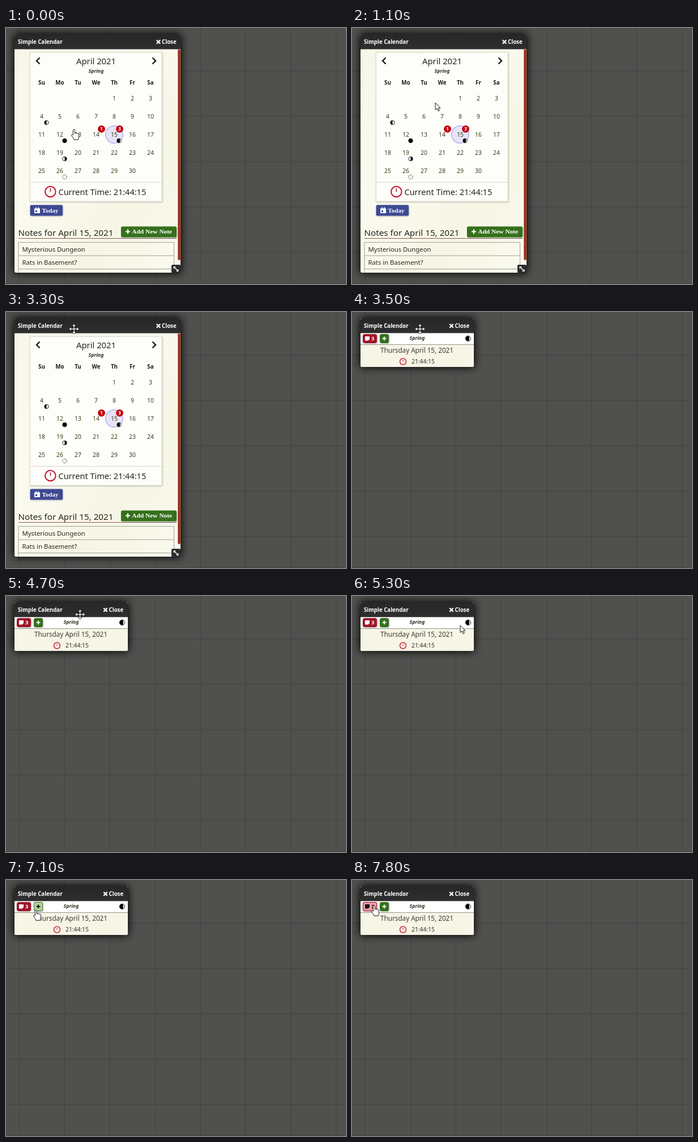
An HTML page for the animation above (8000 ms loop, 600 by 452 pixels).

```html
<!DOCTYPE html>
<html lang="en">
<head>
<meta charset="utf-8">
<title>Calendar</title>
<style>
  html, body { margin: 0; width: 100%; height: 100%; overflow: hidden; background: #50504e; }
  svg { display: block; width: 600px; height: 452px; font-family: "Noto Sans", "Open Sans", sans-serif; }
  .b { font-weight: 600; }
  .m { text-anchor: middle; }
  .title { font-weight: 600; font-size: 9.7px; fill: #fff; }
  .season { font-weight: 600; font-style: italic; font-size: 8.8px; fill: #2b2a18; }
  .serif { font-family: "Liberation Serif", serif; font-weight: 700; fill: #fff; }
  .day { font-size: 10.4px; fill: #3d3b14; }
</style>
</head>
<body>
<svg viewBox="0 0 600 452">
  <defs>
    <filter id="glow" x="-20%" y="-40%" width="140%" height="180%"><feGaussianBlur stdDeviation="7.5"/></filter>
    <filter id="soft" x="-10%" y="-30%" width="120%" height="170%">
      <feDropShadow dx=".6" dy=".8" stdDeviation="1.2" flood-opacity=".35"/>
    </filter>
    <linearGradient id="paper" x2="1" y2="1">
      <stop offset="0" stop-color="#f6f6e7"/><stop offset=".35" stop-color="#fbfaf0"/>
      <stop offset=".7" stop-color="#f6f6e6"/><stop offset="1" stop-color="#fafaee"/>
    </linearGradient>
    <linearGradient id="bar" x2="0" y2="1">
      <stop offset="0" stop-color="#272628"/><stop offset="1" stop-color="#302f30"/>
    </linearGradient>
    <path id="cross" d="M-3.2-3.2 3.2 3.2M3.2-3.2-3.2 3.2" stroke="#fff" stroke-width="2.3"/>
    <path id="plus" d="M-4 0H4M0-4V4" stroke-width="2.2"/>
  </defs>

  <rect width="600" height="452" fill="#50504e"/>
  <path id="grid" stroke="#444342"/>

  <g id="full">
    <rect x="14" y="10" width="295" height="423" rx="4" filter="url(#glow)"/>
    <rect x="15" y="11" width="293" height="421" rx="3" fill="url(#paper)"/>
    <path d="M15 37.500V14a3 3 0 0 1 3-3H305a3 3 0 0 1 3 3V37.500Z" fill="url(#bar)"/>
    <text class="title" x="21" y="28.300">Simple Calendar</text>
    <use href="#cross" x="269" y="24.500"/>
    <text class="title" x="275" y="28.300">Close</text>

    <rect x="42.500" y="43.500" width="232.500" height="262.500" fill="#fdfdfa" stroke="#e0dece" filter="url(#soft)"/>
    <path d="M59.500 52.500 54 58 59.500 63.500M258.500 52.500 264 58 258.500 63.500" fill="none" stroke="#191813" stroke-width="2.4"/>
    <text class="m" x="159" y="64" font-size="14.800" fill="#26251c">April 2021</text>
    <text class="m season" x="159" y="79">Spring</text>
    <g id="days"></g>
    <path d="M43 272.500H275" stroke="#d9d7ca"/>
    <g fill="none" stroke="#c3142d" stroke-width="2"><circle cx="78.300" cy="289" r="9.300"/><path d="M78.300 283V289.500" stroke-width="1.500"/></g>
    <text x="92.500" y="294.500" font-size="14.500" fill="#26251c">Current Time: 21:44:15</text>

    <rect x="42.500" y="312.500" width="57.500" height="19" rx="2.500" fill="#3d4a93" filter="url(#soft)"/>
    <path d="M50 318.500H60V327H50ZM52 316.500h1.600v2H52ZM56.400 316.500H58v2H56.400Z" fill="#fff"/>
    <rect x="52" y="322" width="3" height="3" fill="#3d4a93"/>
    <text class="serif" x="63.500" y="326" font-size="11">Today</text>

    <text x="21.500" y="367" font-size="15.200" fill="#26251c">Notes for April 15, 2021</text>
    <path d="M22 371.500H301" stroke="#8f5a52"/>
    <rect x="203" y="350.500" width="98" height="19" rx="2.500" fill="#36701f" filter="url(#soft)"/>
    <use href="#plus" x="215" y="359.500" stroke="#fff"/>
    <text class="serif" x="222.300" y="363.300" font-size="11.400">Add New Note</text>
    <path d="M22 432V378.500H296.500V432M22 402H296.500M22 425.500H296.500" fill="none" stroke="#a09e96"/>
    <g font-size="11.300" fill="#26251c"><text x="28.500" y="395">Mysterious Dungeon</text><text x="28.500" y="417.500">Rats in Basement?</text></g>

    <rect x="303.500" y="38" width="4" height="371.500" rx="1.500" fill="#9b2a1c" stroke="#cc5a3a" stroke-width=".8"/>
    <rect x="292" y="418" width="16" height="14.500" rx="2" fill="#2d2c2c"/>
    <path d="M297 422.500 303 428.500" stroke="#fff" stroke-width="1.600"/>
    <path d="M295.500 421H300L295.500 425.500ZM304.500 430H300L304.500 425.500Z" fill="#fff"/>
  </g>

  <g id="compact">
    <rect x="14" y="10" width="202" height="88" rx="4" filter="url(#glow)"/>
    <rect x="15" y="11" width="200" height="86" rx="2" fill="#f6f5e6"/>
    <path d="M15 37.500V14a3 3 0 0 1 3-3H212a3 3 0 0 1 3 3V37.500Z" fill="url(#bar)"/>
    <text class="title" x="21" y="28.300">Simple Calendar</text>
    <use href="#cross" x="175.500" y="24.500"/>
    <text class="title" x="181.500" y="28.300">Close</text>
    <rect x="15" y="37.500" width="200" height="20" fill="#fff"/>
    <path d="M15 57.500H215" stroke="#96948c"/>
    <g id="buttons"></g>
    <text class="m season" x="115" y="49.300">Spring</text>
    <g id="phase"></g>
    <text class="m" x="114.500" y="71.800" font-size="11.700" fill="#3b3a33">Thursday April 15, 2021</text>
    <g fill="none" stroke="#c9263c" stroke-width="1.500"><circle cx="90" cy="87.500" r="5.500"/><path d="M90 84V88" stroke-width="1"/></g>
    <text x="105" y="91" font-size="10.300" fill="#33322b">21:44:15</text>
  </g>

  <g id="cursor" stroke="#161616" stroke-linejoin="round" fill="#fff">
    <path id="arrow" d="M0 0V12.500L3 9.800 5.200 14.800 7.300 13.900 5.200 9.200H9Z"/>
    <path id="hand" d="M-1.600 9V.5a1.500 1.500 0 0 1 3 0V6c.4-1.200 2.500-1 2.600.3.400-1 2.300-.8 2.400.5.500-.8 2.200-.5 2.200.9V12c0 2.500-1.200 3-1.200 5.200H-.2C-.5 14.500-2.500 13-4.400 9.900-5.200 8.500-3.200 7.300-1.600 9Z"/>
    <path id="move" stroke-width=".8" d="M0-9 3.300-5H1V-1H5V-3.300L9 0 5 3.300V1H1V5H3.300L0 9-3.300 5H-1V1H-5V3.300L-9 0-5-3.300V-1H-1V-5H-3.300Z"/>
  </g>
</svg>
<script>
const $ = id => document.getElementById(id);
const colX = c => 63 + 32 * c;
const rowY = r => 124 + 32 * r;

let lines = "M0 451.500H600";
for (let i = 0; i < 8; i++) lines += `M${Math.round(23.3 + 79.8 * i) + .5} 0V452`;
for (let i = 0; i < 5; i++) lines += `M0 ${76 + 80 * i}H600`;
$("grid").setAttribute("d", lines);

// Dark limb on the left; k is the bulge of the terminator to the right.
function moon(x, y, r, k, flip = 1, dash = "") {
  return `<g transform="translate(${x} ${y}) scale(${flip} 1)">
    <circle r="${r}" fill="#fff" stroke="#111" stroke-width=".9" stroke-dasharray="${dash}"/>` +
    (dash ? "" : `<path d="M0 ${-r}A${r} ${r} 0 0 0 0 ${r}A${k} ${r} 0 0 0 0 ${-r}"/>`) + "</g>";
}

function badge(x, n) {
  return `<circle cx="${x}" cy="178.300" r="6.400" fill="#c4000d"/>
    <text class="m b" x="${x}" y="181.300" font-size="8.500" fill="#fff">${n}</text>`;
}

let html = ["Su", "Mo", "Tu", "We", "Th", "Fr", "Sa"].map((d, c) =>
  `<text class="m b" x="${colX(c)}" y="100" font-size="9.800" fill="#1f1e15">${d}</text>`).join("");
html += '<circle cx="191" cy="188" r="15.300" fill="#e6e4f5" stroke="#b9b5f2" stroke-width="1.600"/>';
for (let d = 1; d <= 30; d++) {
  const cell = d + 3;
  html += `<text class="m day" x="${colX(cell % 7)}" y="${rowY(Math.floor(cell / 7)) + 3.8}">${d}</text>`;
}
html += badge(168.5, 1) + badge(200.5, 3);
html += moon(71.5, 167, 3.7, .01) + moon(103.5, 199, 3.7, 3.7) + moon(199.5, 199, 3.7, 1.6) +
  moon(103.5, 231, 3.7, .01, -1) + moon(103.5, 263, 3.7, 0, 1, "1.600 1");
$("days").innerHTML = html;
$("phase").innerHTML = moon(205, 46.8, 4.6, 2);

function noteButton(fill, ink, edge) {
  return `<rect x="19.500" y="39.500" width="24" height="15" rx="2.500" fill="${fill}" stroke="${edge}"/>
    <path d="M23 43H31V48L28.500 50.500H23Z" fill="${ink}"/>
    <text class="m b" x="36.800" y="50.200" font-size="9.500" fill="${ink}">3</text>`;
}
function addButton(fill, ink, edge) {
  return `<rect x="49.500" y="39.500" width="15" height="15" rx="2.500" fill="${fill}" stroke="${edge}"/>
    <use href="#plus" transform="translate(57 46.800) scale(.85)" stroke="${ink}"/>`;
}
$("buttons").innerHTML =
  `<g filter="url(#soft)">${noteButton("#a0152b", "#fff", "#a0152b")}${addButton("#36701f", "#fff", "#36701f")}</g>
   <g id="noteHot">${noteButton("#f79da6", "#111", "#a0152b")}</g>
   <g id="addHot">${addButton("#b4d39a", "#111", "#477a32")}</g>`;

// Pointer way points: time, x, y
const path = [
  [0, 120, 180], [100, 246, 100], [200, 198, 353], [300, 150, 334],
  [400, 150, 334], [500, 134, 290], [600, 132, 180], [700, 150, 95], [800, 205, 68],
  [900, 240, 150], [1000, 190, 215], [1100, 147, 132], [1200, 190, 84], [1300, 238, 200],
  [1400, 250, 285], [1500, 190, 335], [1600, 95, 300], [1700, 67, 205], [1800, 74, 115],
  [1900, 98, 60], [2000, 116, 36], [2100, 120, 30],
  [4500, 120, 30], [4800, 136, 34], [5100, 178, 48], [5300, 191, 52], [5400, 191, 52], [5500, 195, 52],
  [5600, 195, 52], [5900, 160, 70], [6200, 90, 78], [6350, 65, 76], [6500, 78, 77],
  [6700, 64, 64], [6900, 55, 53], [7100, 53, 54], [7200, 51, 52], [7300, 43, 48],
  [7400, 37, 47], [7500, 34, 48], [7600, 36, 49], [7800, 39, 46], [8000, 39, 46]
];

const ramp = (t, a, b) => Math.min(1, Math.max(0, (t - a) / (b - a)));

function place(t) {
  const i = Math.max(1, path.findIndex(p => p[0] >= t));
  const [t0, x0, y0] = path[i - 1], [t1, x1, y1] = path[i];
  const k = ramp(t, t0, t1);
  return [x0 + (x1 - x0) * k, y0 + (y1 - y0) * k];
}

function shape(x, y, open) {
  if (y < 37) return "move";
  if (!open) return y < 55 && y > 39 && (x > 19 && x < 44 || x > 49 && x < 65) ? "hand" : "arrow";
  const c = Math.round((x - 63) / 32), r = Math.round((y - 124) / 32), d = r * 7 + c - 3;
  const over = c >= 0 && c < 7 && d > 0 && d <= 30 && Math.hypot(x - colX(c), y - rowY(r)) < 16;
  return over ? "hand" : "arrow";
}

function draw(now) {
  const t = Math.floor(now % 8000 / 100) * 100;
  const open = t < 3500;
  $("full").style.display = open ? "" : "none";
  $("compact").style.display = open ? "none" : "";
  const [x, y] = place(t);
  const kind = shape(x, y, open);
  for (const id of ["arrow", "hand", "move"]) $(id).style.display = id === kind ? "" : "none";
  $("cursor").setAttribute("transform", `translate(${x} ${y})`);
  $("addHot").style.opacity = ramp(t, 6700, 7000) - ramp(t, 7200, 7500);
  $("noteHot").style.opacity = ramp(t, 7200, 7500);
}

const start = performance.now();
function loop() {
  draw(performance.now() - start);
  requestAnimationFrame(loop);
}
loop();
</script>
</body>
</html>
```
